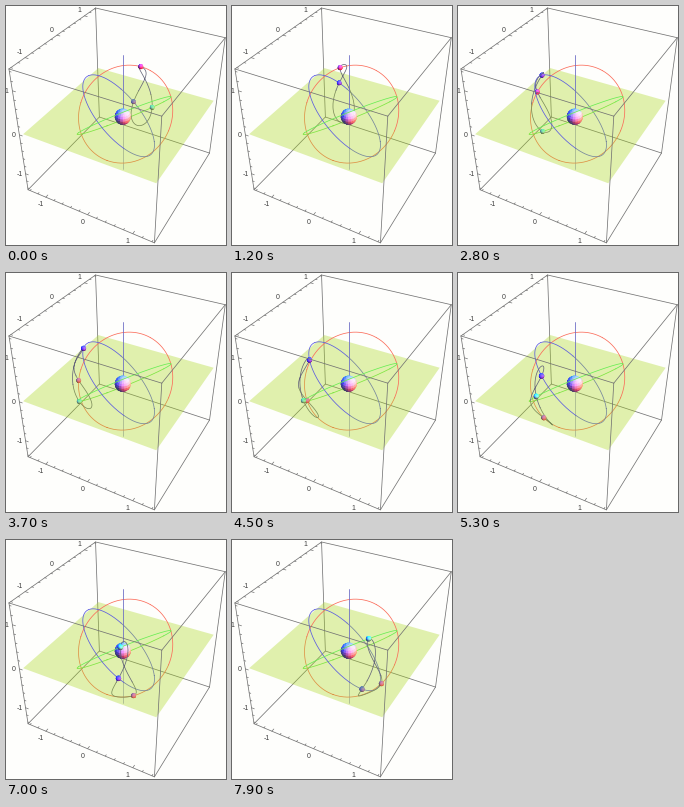
A matplotlib script that plays this animation: 220 by 239 pixels, repeating every 8 s.

```python
import numpy as np
import matplotlib.pyplot as plt
from matplotlib.animation import FuncAnimation
from matplotlib.collections import PolyCollection

W, H, DPI = 220, 239, 100
FRAMES, STEP = 80, 3                # degrees of mean anomaly per frame
R, EXT = 1.45, 1.4                  # half box, half plane / axis
ECC, INC = 0.075, np.radians(45)
PX = 72 / DPI                       # one pixel in points
PAPER, FRAME = "#fefefc", "#727272"

# Camera basis: right, up, towards the viewer
VIEW = np.array([1.3, -2.4, 2.0])
DIST = np.linalg.norm(VIEW)
OUT = VIEW / DIST
RIGHT = np.array([-OUT[1], OUT[0], 0]) / np.hypot(OUT[0], OUT[1])
BASIS = np.array([RIGHT, np.cross(OUT, RIGHT), OUT])

# Directional red, green and blue lights in camera space
LIGHTS = np.array([[1, 0, 1], [1, 1, 1], [0, 1, 1]], float)
LIGHTS /= np.linalg.norm(LIGHTS, axis=1, keepdims=True)
POWER = np.array([1.0, 0.72, 0.95])
AMBIENT = np.array([0.22, 0.22, 0.42])


def project(p):
    """Data points (..., 3) to pixel positions (..., 2)."""
    a, b, c = np.moveaxis(np.asarray(p, float) @ BASIS.T / (2 * R), -1, 0)
    s = 491.5 / (DIST - c)
    return np.stack([116.8 + a * s, 110.7 - b * s], -1)


def orbit(node, mean):
    """Position on an inclined orbit with its apogee at the northernmost point."""
    node, mean = np.broadcast_arrays(np.radians(node), np.radians(mean))
    E = mean
    for _ in range(8):
        E = mean + ECC * np.sin(E)
    along = np.cos(E) - ECC
    across = np.sqrt(1 - ECC**2) * np.sin(E)
    zero = np.zeros_like(node)
    asc = np.stack([np.cos(node), np.sin(node), zero], -1)
    north = np.stack([-np.sin(node) * np.cos(INC), np.cos(node) * np.cos(INC),
                      zero + np.sin(INC)], -1)
    return across[..., None] * asc - along[..., None] * north


def layer(p):
    """Z-order: 1 under the plane, 3 behind the globe, 5 in front of it."""
    return np.where(p[..., 2] < 0, 1, np.where(p @ OUT < 0, 3, 5))


class Curve:
    def __init__(self, color, width):
        self.parts = {z: ax.plot([], [], color=color, lw=width * PX, zorder=z)[0]
                      for z in (1, 3, 5)}

    def set(self, p):
        q = project(p)
        seg = layer((p[:-1] + p[1:]) / 2)
        for z, line in self.parts.items():
            on = np.zeros(len(p), bool)
            on[:-1] |= seg == z
            on[1:] |= seg == z
            line.set_data(*np.where(on[:, None], q, np.nan).T)


class Ball:
    def __init__(self, radius, tint, nlon, nlat):
        self.radius, self.tint = radius, np.array(tint)
        lon = np.linspace(0, 2 * np.pi, nlon + 1)
        lat = np.linspace(-np.pi / 2, np.pi / 2, nlat + 1)
        lo, la = np.meshgrid(lon, lat)
        g = np.stack([np.cos(la) * np.cos(lo), np.cos(la) * np.sin(lo), np.sin(la)], -1)
        quads = np.stack([g[:-1, :-1], g[:-1, 1:], g[1:, 1:], g[1:, :-1]], 2)
        self.quads = quads.reshape(-1, 4, 3)
        self.art = PolyCollection([], linewidths=0.3)
        ax.add_collection(self.art, autolim=False)

    def set(self, center, spin, z):
        c, s = np.cos(spin), np.sin(spin)
        quads = self.quads @ np.array([[c, s, 0], [-s, c, 0], [0, 0, 1]])
        normal = quads.mean(1)
        normal /= np.linalg.norm(normal, axis=1, keepdims=True)
        seen = (VIEW * 2 * R - center - normal * self.radius) * normal
        keep = seen.sum(1) > 0
        light = np.clip((normal[keep] @ BASIS.T) @ LIGHTS.T, 0, 1)
        rgb = np.clip((AMBIENT + POWER * light) * self.tint, 0, 1)
        self.art.set_verts(list(project(center + quads[keep] * self.radius)))
        self.art.set_facecolor(rgb)
        self.art.set_edgecolor(rgb)
        self.art.set_zorder(z)


def segment(p, q, color, width, z):
    ax.plot(*project([p, q]).T, color=color, lw=width * PX, zorder=z,
            solid_capstyle="round")


def draw_box():
    sides = (-R, R)
    for axis in range(3):
        for m in sides:
            for n in sides:
                p = np.insert(np.array([m, n], float), axis, -R)
                q = np.insert(np.array([m, n], float), axis, R)
                front = (R, -R, R) in (tuple(p), tuple(q))
                segment(p, q, FRAME, 0.75, 6 if front else 0)


def draw_ticks(axis, base, inward, shift):
    for k in range(-7, 8):
        p = np.array(base, float)
        p[axis] = k / 5
        size = 0.07 if k % 5 == 0 else 0.04
        segment(p, p + size * np.array(inward), FRAME, 0.7, 6)
        if k % 5 == 0:
            x, y = project(p) + shift
            ax.text(x, y, str(k // 5), size=7 * PX, family="Liberation Sans",
                    color="#404040", ha="center", va="center_baseline", zorder=7)


fig = plt.figure(figsize=(W / DPI, H / DPI), dpi=DPI, facecolor=PAPER)
ax = fig.add_axes([0, 0, 1, 1])
ax.set_xlim(0, W)
ax.set_ylim(H, 0)
ax.axis("off")

draw_box()
draw_ticks(0, (0, -R, -R), (0, 1, 0), (-5, 6.5))
draw_ticks(1, (-R, 0, R), (1, 0, 0), (-5, -6))
draw_ticks(2, (-R, -R, 0), (1, 0, 0), (-5.5, 0))

corners = [(-EXT, -EXT, 0), (EXT, -EXT, 0), (EXT, EXT, 0), (-EXT, EXT, 0)]
ax.add_patch(plt.Polygon(project(corners), fc=(0.66, 0.84, 0.11, 0.35), ec="none",
                         zorder=2))
segment((0, 0, -EXT), (0, 0, 0), "#9a9ac8", 0.7, 1)
segment((0, 0, 0), (0, 0, EXT), "#6a6ac4", 0.8, 3.5)

turn = np.linspace(0, 360, 181)
NODES = (0, 120, 240)
for node, color in zip(NODES, ("#fb6a58", "#5a5ae0", "#66ee52")):
    Curve(color, 0.75).set(orbit(node, turn))

track = Curve("#66667a", 0.75)
globe = Ball(0.158, (1, 1, 1), 18, 10)
sats = [Ball(0.046, tint, 12, 8)
        for tint in ((1.5, 0.45, 0.75), (0.6, 0.5, 1.4), (0.5, 1.4, 1.0))]


def update(i):
    angle = STEP * i
    track.set(orbit(turn, 180 + angle - turn))
    globe.set(np.zeros(3), np.radians(angle), 4)
    for node, sat in zip(NODES, sats):
        p = orbit(node, 180 + angle - node)
        sat.set(p, np.radians(angle), layer(p) + 0.5)
    return []


anim = FuncAnimation(fig, update, frames=FRAMES, interval=100,
                     init_func=lambda: [], repeat=True, repeat_delay=0)
plt.show()
```
